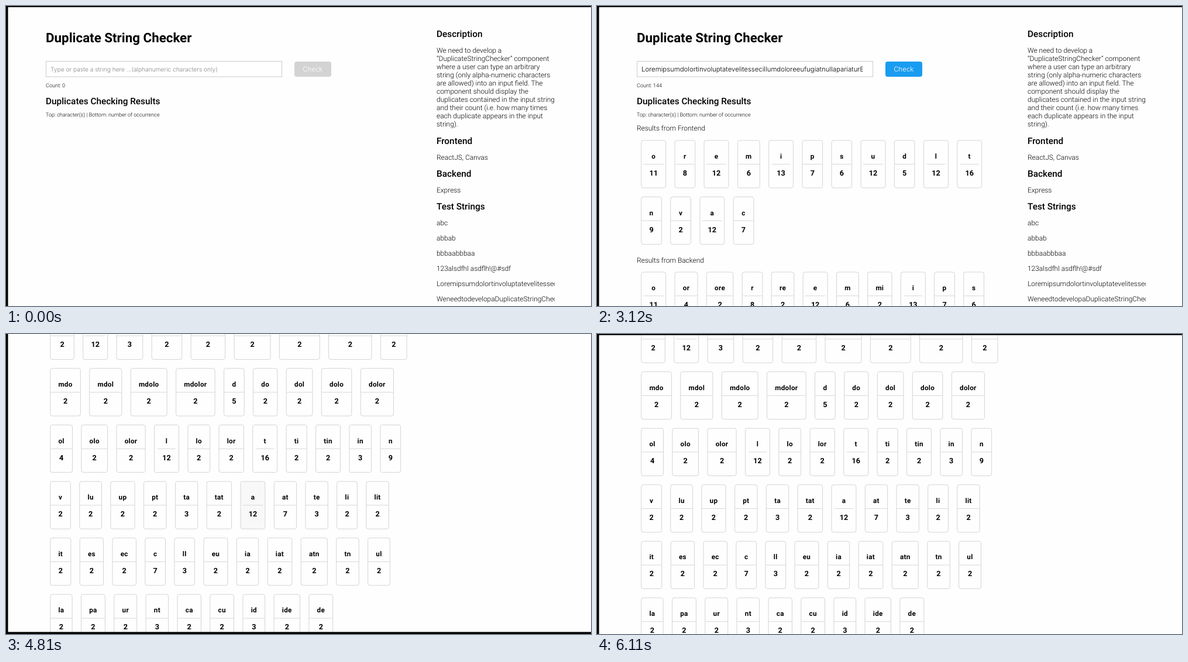
An HTML page that plays this animation: 1000 px wide and 513 px high, repeating every 7540 ms.

```html
<!DOCTYPE html>
<html lang="en">
<head>
<meta charset="utf-8">
<title>Duplicate String Checker</title>
<style>
html, body { margin: 0; width: 100%; height: 100%; overflow: hidden; background: #fefefe; }
svg { display: block; width: 1000px; height: 513px; }
text { font: 300 11.95px Roboto, sans-serif; text-rendering: geometricPrecision; white-space: pre; }
.title { font-size: 22.35px; font-weight: 600; }
.head { font-size: 15.35px; font-weight: 500; }
.small { font-size: 9.05px; }
.name { font-size: 11.7px; font-weight: 700; letter-spacing: .3px; text-anchor: middle; }
.count { font-size: 12.6px; font-weight: 700; text-anchor: middle; }
.hint { font: 300 10.2px Inter, sans-serif; fill: #858585; }
.typed { font: 300 11.4px Inter, sans-serif; }
.label { font: 300 11.5px Inter, sans-serif; text-anchor: middle; fill: #fff; }
.card { fill: #fefefe; stroke: #d4d4d4; }
.rule { stroke: #d8d8d8; }
</style>
</head>
<body>
<svg viewBox="0 0 1000 513">
  <defs>
    <clipPath id="inputClip"><rect x="76" y="95" width="378.5" height="26"/></clipPath>
    <clipPath id="sideClip"><rect x="730" y="0" width="208" height="600"/></clipPath>
  </defs>
  <g id="page"></g>
  <rect width="3.5" height="513"/>
  <rect id="topBar" width="1000" height="2"/>
  <rect id="bottomBar" y="509.5" width="1000" height="3.5"/>
</svg>
<script>
const LOOP = 7540;
const TYPED = "Loremipsumdolortinvoluptatevelitessecillumdoloreeufugiatnullapariatur" +
  "Excepteursintoccaecatcupidatatnonproidentsuntinculpatmollitanimidestlaborum";
const FRONTEND = ["o11 r8 e12 m6 i13 p7 s6 u12 d5 l12 t16", "n9 v2 a12 c7"];
const BACKEND = [
  "o11 or4 ore2 r8 re2 e12 m6 mi2 i13 p7 s6",
  "su2 u12 um3 umd2 umdo2 umdol2 umdolo2 umdolor2 md2",
  "mdo2 mdol2 mdolo2 mdolor2 d5 do2 dol2 dolo2 dolor2",
  "ol4 olo2 olor2 l12 lo2 lor2 t16 ti2 tin2 in3 n9",
  "v2 lu2 up2 pt2 ta3 tat2 a12 at7 te3 li2 lit2",
  "it2 es2 ec2 c7 ll3 eu2 ia2 iat2 atn2 tn2 ul2",
  "la2 pa2 ur2 nt3 ca2 cu2 id3 ide2 de2"
];
const ABOUT = ["We need to develop a", "“DuplicateStringChecker“ component",
  "where a user can type an arbitrary", "string (only alpha-numeric characters",
  "are allowed) into an input field. The", "component should display the",
  "duplicates contained in the input string", "and their count (i.e. how many times",
  "each duplicate appears in the input", "string)."];
const SAMPLES = ["abc", "abbab", "bbbaabbbaa", "123alsdfhl asdflh!@#sdf",
  TYPED.slice(0, 45), "WeneedtodevelopaDuplicateStringChecker"];

const pen = document.createElement("canvas").getContext("2d");
pen.textRendering = "geometricPrecision";
const measure = (s, size, spacing = 0) => {
  pen.font = `700 ${size}px Roboto, sans-serif`;
  return pen.measureText(s).width + s.length * spacing;
};
const text = (x, y, s, cls = "", id = "") =>
  `<text x="${x}" y="${y}" class="${cls}" id="${id}">${s}</text>`;

const boxes = [];
function cardRow(row, y) {
  let x = 75.2;
  return row.split(" ").map(item => {
    const [, name, count] = item.match(/([a-z]+)(\d+)/);
    const nameW = measure(name, 11.7, .3);
    const w = Math.max(nameW, measure(count, 12.6)) + 28.45;
    const mid = x + w / 2, half = nameW / 2 + 13.8;
    boxes.push({ x, y, w });
    const svg = `<rect class="card" x="${x + .5}" y="${y + .5}" width="${w - 1}" height="81.2" rx="3.5"/>` +
      `<path class="rule" d="M${mid - half} ${y + 41.2}h${half * 2}"/>` +
      text(mid, y + 31.6, name, "name") + text(mid, y + 60.6, count, "count");
    x += w + 14.4;
    return svg;
  }).join("");
}
const results = (id, title, y, rows) => `<g id="${id}">` +
  text(68, y, "Results from " + title) +
  rows.map((r, i) => cardRow(r, y + 15.9 + i * 96.6)).join("") + "</g>";

const sidebar = [
  text(736, 53, "Description", "head"), ...ABOUT.map((s, i) => text(736, 80 + 14 * i, s)),
  text(736, 236.3, "Frontend", "head"), text(736, 263, "ReactJS, Canvas"),
  text(736, 292.3, "Backend", "head"), text(736, 319, "Express"),
  text(736, 348.3, "Test Strings", "head"), ...SAMPLES.map((s, i) => text(736, 375 + 26 * i, s))
].join("");

const $ = id => document.getElementById(id);
$("page").innerHTML =
  text(68, 62, "Duplicate String Checker", "title") +
  `<rect id="field" x="68.5" y="94.5" width="403" height="26.5" fill="#fff"/>
  <g clip-path="url(#inputClip)">` +
  text(76, 111.5, "Type or paste a string here ...(alphanumeric characters only)", "hint", "hint") +
  text(76, 111.5, TYPED, "typed", "typed") + `</g>
  <g id="clear"><circle cx="459.3" cy="107.3" r="4.8" fill="#c4c4c4"/>
  <path d="M457.5 105.5l3.6 3.6m0-3.6l-3.6 3.6" stroke="#fff"/></g>
  <path id="caret" stroke="#000" d="M0 100.5v14"/>
  <rect id="button" x="493" y="95" width="63" height="26" rx="4"/>` +
  text(524.3, 111.5, "Check", "label") +
  text(68, 138.6, "", "small", "count") +
  text(68, 167.6, "Duplicates Checking Results", "head") +
  text(68, 188.5, "Top: character(s) | Bottom: number of occurrence", "small") +
  results("frontend", "Frontend", 213.4, FRONTEND) +
  results("backend", "Backend", 438.6, BACKEND) +
  `<g clip-path="url(#sideClip)">${sidebar}</g>`;
const cards = document.querySelectorAll(".card");

const SCROLL = [[0, 0], [3900, 34], [4030, 120], [4680, 498], [4810, 589.3], [6110, 583.6]];
const BUTTON = [[0, "#d3d3d3"], [1170, "#79aedc"], [1300, "#1e88e8"], [1820, "#1a9cf0"],
  [2210, "#1e88e8"], [2340, "#1a9cf0"], [3510, "#1e88e8"]];
const CARET = [[0, 0], [260, 1], [780, 0], [1170, 1], [1820, 0], [2210, 1], [2730, 0]];
const at = (steps, t) => steps.findLast(s => s[0] <= t)[1];
const show = (id, on) => $(id).style.display = on ? "" : "none";

function draw(now) {
  const t = now % LOOP;
  const scroll = at(SCROLL, t), filled = t >= 1170, blurred = t >= 2730;
  const bounce = t >= 4810 && t < 6110;
  $("page").setAttribute("transform", `translate(0 ${-scroll})`);
  $("field").setAttribute("stroke", t >= 260 && t < 1820 ? "#2590e0" : "#ccc");
  $("button").setAttribute("fill", at(BUTTON, t));
  $("count").textContent = "Count: " + (filled ? 144 : 0);

  // The focused field shows the end of the string, the blurred one its start.
  $("typed").setAttribute("x", blurred ? 76 : 453);
  $("typed").setAttribute("text-anchor", blurred ? "start" : "end");
  $("caret").setAttribute("transform", `translate(${filled ? 453.5 : 76.5} 0)`);
  show("hint", !filled);
  show("typed", filled);
  show("clear", filled && !blurred);
  show("caret", at(CARET, t));
  show("frontend", t >= 2730);
  show("backend", t >= 3120);
  show("topBar", !bounce);
  show("bottomBar", bounce);

  // The pointer rests at (428, 262) while the page scrolls under it.
  const py = 262 + scroll;
  boxes.forEach(({ x, y, w }, i) => {
    const over = t >= 3900 && t < 6110 && x < 428 && 428 < x + w && y < py && py < y + 82.2;
    cards[i].style.fill = over ? "#f8f8f8" : "";
  });
}
const start = performance.now();
(function tick() {
  draw(performance.now() - start);
  requestAnimationFrame(tick);
})();
</script>
</body>
</html>
```
